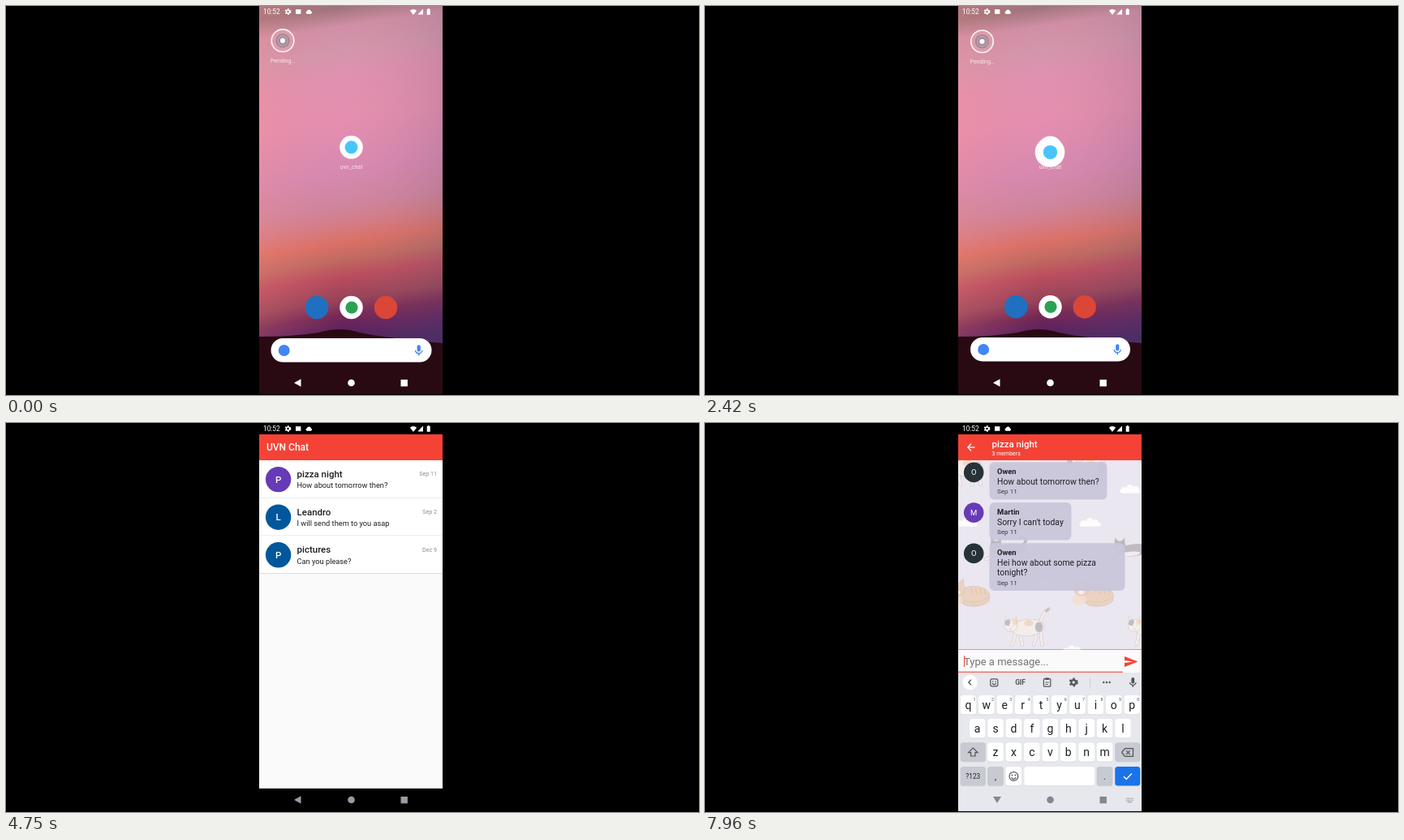
Recreate the animation shown at these times as an HTML page with a canvas. Size 854 px wide and 480 px high, loop 8 s.

```html
<!DOCTYPE html>
<html lang="en">
<head>
<meta charset="utf-8">
<title>Chat app demo</title>
<style>
html, body { margin: 0; width: 100%; height: 100%; overflow: hidden; background: #000; }
canvas { display: block; }
</style>
</head>
<body>
<canvas id="stage" width="854" height="480"></canvas>
<script>
const ctx = document.getElementById('stage').getContext('2d');
const LOOP = 8000, L = 312, R = 538, W = 226, H = 479, CX = 425.5;
const FONT = 'Roboto, Arial, sans-serif';
const RED = '#f44336', WHITE = '#fff', PAPER = '#fafafa', INK = '#1f1f23', DIM = '#9c9c9e';

// Start times of the steps, in ms
const LAUNCH = 2330, READY = 3760, LOADED = 4250, OPEN = 5250, TYPE = 7220;

// --- helpers ---
const clamp = v => Math.max(0, Math.min(1, v));
const span = (t, start, dur) => clamp((t - start) / dur);
const mix = (a, b, p) => a + (b - a) * p;
const easeInOut = (p, n) => p < .5 ? 2 ** (n - 1) * p ** n : 1 - (2 - 2 * p) ** n / 2;
const easeOut = p => 1 - (1 - p) ** 3;

function rect(x, y, w, h, fill) { ctx.fillStyle = fill; ctx.fillRect(x, y, w, h); }
function disc(x, y, r, fill) {
  ctx.beginPath(); ctx.arc(x, y, r, 0, 7); ctx.fillStyle = fill; ctx.fill();
}
function ring(x, y, r, color, width = 1) {
  ctx.beginPath(); ctx.arc(x, y, r, 0, 7);
  ctx.strokeStyle = color; ctx.lineWidth = width; ctx.stroke();
}
function round(x, y, w, h, r, fill) {
  ctx.beginPath(); ctx.roundRect(x, y, w, h, r); ctx.fillStyle = fill; ctx.fill();
}
function poly(fill, ...p) {
  ctx.beginPath();
  for (let i = 0; i < p.length; i += 2) ctx.lineTo(p[i], p[i + 1]);
  ctx.closePath(); ctx.fillStyle = fill; ctx.fill();
}
function line(color, width, ...p) {
  ctx.beginPath();
  for (let i = 0; i < p.length; i += 2) ctx.lineTo(p[i], p[i + 1]);
  ctx.strokeStyle = color; ctx.lineWidth = width; ctx.stroke();
}
function oval(x, y, rx, ry, fill, turn = 0) {
  ctx.beginPath(); ctx.ellipse(x, y, rx, ry, turn, 0, 7); ctx.fillStyle = fill; ctx.fill();
}
function text(str, x, y, size, color, weight = 400, align = 'left') {
  ctx.font = `${weight} ${size}px ${FONT}`;
  ctx.textAlign = align; ctx.fillStyle = color; ctx.fillText(str, x, y);
}
function group(draw) { ctx.save(); draw(); ctx.restore(); }
function clipRect(x, y, w, h) { ctx.beginPath(); ctx.rect(x, y, w, h); ctx.clip(); }

// --- shared icons ---
function gear(x, y, r, color) {
  ctx.setLineDash([r * .5, r * .547]);
  ring(x, y, r * .95, color, r * .4);
  ctx.setLineDash([]);
  ring(x, y, r * .6, color, r * .45);
}
function mic(x, y, s, color) {
  round(x - 2 * s, y - 6 * s, 4 * s, 8 * s, 2 * s, color);
  ctx.beginPath(); ctx.arc(x, y, 4 * s, .1, Math.PI - .1);
  ctx.strokeStyle = color; ctx.lineWidth = 1.3 * s; ctx.stroke();
  rect(x - .7 * s, y + 4 * s, 1.4 * s, 2.6 * s, color);
}
function statusBar(color) {
  text('10:52', 317, 10.2, 8.3, color);
  gear(347.5, 7, 3.4, color);
  rect(357, 4.2, 6.4, 5.6, color);
  disc(371.3, 8, 1.8, color); disc(373.4, 6.8, 2.4, color); disc(375.4, 8.1, 1.6, color);
  rect(371, 7.5, 4.6, 2.2, color);
  ctx.beginPath(); ctx.moveTo(502, 11); ctx.arc(502, 9.5, 5.6, Math.PI * 1.24, Math.PI * 1.76);
  ctx.fillStyle = color; ctx.fill();
  poly(color, 507.3, 10.6, 514, 10.6, 514, 3.6);
  rect(518.7, 4, 4, 6.8, color); rect(519.8, 3, 1.8, 1, color);
}
function navBar(color, down) {
  if (down) poly(color, 355, 461, 365, 461, 360, 469);
  else poly(color, 355, 465, 363.5, 460.3, 363.5, 469.7);
  disc(CX, 465, 4.3, color);
  rect(486.5, 461, 8.4, 8.4, color);
}

// --- home screen ---
function wallpaper() {
  const len = 420, g = ctx.createLinearGradient(CX, 0, CX + .147 * len, .978 * len);
  const stops = [[0, '#a0747c'], [.03, '#b98392'], [.055, '#d08fa6'], [.13, '#d396ac'], [.2, '#e091b0'],
    [.33, '#e58fb0'], [.48, '#d789b1'], [.58, '#cf859f'], [.635, '#d47d86'], [.69, '#db7066'],
    [.74, '#c06a60'], [.79, '#ba4d5e'], [.86, '#964257'], [.905, '#752855'], [.95, '#5b215e'], [1, '#43225e']];
  stops.forEach(s => g.addColorStop(...s));
  rect(L, 0, W, H, g);
  const side = ctx.createLinearGradient(L, 0, R, 0);
  side.addColorStop(0, 'rgba(255,145,135,.2)');
  side.addColorStop(.45, 'rgba(220,130,140,0)');
  side.addColorStop(1, 'rgba(115,95,120,.2)');
  rect(L, 0, W, 416, side);
  ctx.beginPath(); ctx.moveTo(L, 408);
  ctx.quadraticCurveTo(355, 408, 385, 403);
  ctx.quadraticCurveTo(412, 395, 436, 403);
  ctx.quadraticCurveTo(470, 410, R, 416);
  ctx.lineTo(R, H); ctx.lineTo(L, H);
  ctx.fillStyle = '#290a12'; ctx.fill();
}
function homeIcons() {
  const label = '#fbe6e6';
  disc(341, 42.7, 13.6, 'rgba(225,165,178,.65)');
  ring(341, 42.7, 13.8, '#fff6f2', 1.6);
  disc(341, 42.7, 8.8, '#a5899a');
  ring(341, 42.7, 6, '#bda2ae', 1.5);
  disc(341, 42.7, 3.1, WHITE);
  text('Pending...', 326, 70, 7, label);
  disc(CX, 174.3, 14.3, WHITE);
  disc(CX, 174.3, 8, '#47c5fb');
  text('uvn_chat', CX, 201, 7, label, 400, 'center');
  disc(383, 372, 14.3, '#1f70c1');
  disc(CX, 372, 14.3, WHITE);
  disc(CX + .5, 372, 7.6, '#2aa252');
  disc(468, 372, 14.3, '#db4636');
  round(326.5, 410, 198, 29.6, 14.8, WHITE);
  disc(342.7, 425, 7, '#4285f4');
  mic(508.7, 424.5, 1.05, '#4285f4');
}
function home(t) {
  const p = easeInOut(span(t, LAUNCH, 420), 2);
  wallpaper();
  group(() => {
    const s = 1 - .06 * p;
    ctx.globalAlpha = 1 - p ** 3;
    ctx.translate(CX, 230); ctx.scale(s, s); ctx.translate(-CX, -230);
    homeIcons();
  });
  statusBar(WHITE); navBar(WHITE);
}

// --- app window opening from its icon, then the launch screen ---
function splash(t) {
  const q = span(t, LAUNCH, 420), wide = easeInOut(q, 3), tall = easeInOut(q, 4);
  const hw = mix(14.3, 113, wide), hh = mix(14.3, 239.5, tall);
  const cy = mix(174.3, 239.5, easeInOut(q, 2));
  round(CX - .5 - hw, cy - hh, hw * 2, hh * 2, mix(Math.min(hw, hh), 0, tall), '#fdfdfd');
  group(() => {
    ctx.globalAlpha = mix(1, .45, span(t, 2800, 500));
    disc(CX, cy, mix(8, 25, wide), '#47c5fb');
  });
  if (q > .9) { statusBar('#666'); navBar('#707070'); }
}

// --- conversation list ---
function avatar(x, y, r, letter, fill, size, weight) {
  disc(x, y, r, fill);
  text(letter, x, y + size * .36, size, WHITE, weight, 'center');
}
const ROWS = [
  ['pizza night', 'How about tomorrow then?', 'Sep 11', '#673ab7'],
  ['Leandro', 'I will send them to you asap', 'Sep 2', '#01579b'],
  ['pictures', 'Can you please?', 'Dec 9', '#01579b']
];
function listPage(t) {
  rect(L, 0, W, H, '#000');
  rect(L, 14, W, 437, PAPER);
  rect(L, 14, W, 32, RED);
  text('UVN Chat', 321, 34.3, 12, WHITE, 500);
  if (t > LOADED) ROWS.forEach(([name, last, date, fill], i) => {
    const y = 46 + i * 46.6;
    rect(L, y, W, 46.6, WHITE);
    rect(L, y + 46, W, .9, '#d8d8da');
    avatar(335.6, y + 23.6, 15.7, name[0].toUpperCase(), fill, 11.5, 500);
    text(name, 358.5, y + 21.2, 11.5, INK, 500);
    text(last, 358.5, y + 34.3, 9.25, INK);
    text(date, 531, y + 19.4, 7.1, '#8a8a8e', 400, 'right');
  });
  statusBar(WHITE); navBar(DIM);
}

// --- cat wallpaper ---
const WALL = '#ebe7f0', EDGE = '#cbbfc0', GREY = '#b7b4ba', TAN = '#f0d5c0', FUR = '#fbf5f1';
function cloud(x, y) {
  disc(x - 10, y + 2, 4.5, WHITE); disc(x - 1, y - 1, 5.5, WHITE); disc(x + 8, y + 1, 5, WHITE);
  round(x - 17, y + 1, 34, 6, 3, WHITE);
}
function head(x, y, r, fill) {
  poly(fill, x - r, y, x - r * .9, y - r * 1.6, x - r * .1, y - r * .8);
  poly(fill, x + r, y, x + r * .9, y - r * 1.6, x + r * .1, y - r * .8);
  oval(x, y, r * 1.1, r, fill);
  disc(x - r * .4, y, .8, EDGE); disc(x + r * .4, y, .8, EDGE);
}
// A rounded stroke with a thin outline, for tails and legs
function limb(x1, y1, cx, cy, x2, y2, fill, width) {
  ctx.lineCap = 'round';
  for (const [c, w] of [[EDGE, width + 1.3], [fill, width]]) {
    ctx.beginPath(); ctx.moveTo(x1, y1); ctx.quadraticCurveTo(cx, cy, x2, y2);
    ctx.strokeStyle = c; ctx.lineWidth = w; ctx.stroke();
  }
  ctx.lineCap = 'butt';
}
function calico(x, y) {
  limb(x + 22, y - 6, x + 24, y - 22, x + 36, y - 30, FUR, 4);
  line(GREY, 3, x + 30, y - 25, x + 36, y - 30);
  for (const [dx, lean] of [[-17, -5], [-9, 3], [16, -4], [23, 2]])
    limb(x + dx, y + 4, x + dx, y + 16, x + dx + lean, y + 27, FUR, 4);
  oval(x + 3, y, 25.7, 13.4, EDGE, -.1); oval(x + 3, y, 25, 12.7, FUR, -.1);
  oval(x + 4, y - 7, 7, 5, TAN); oval(x + 20, y - 1, 6, 8, GREY);
  head(x - 24, y - 3, 9.6, EDGE); head(x - 24, y - 3, 9, FUR);
  oval(x - 29, y - 8, 4, 5, GREY, .4); oval(x - 17, y - 9, 4.5, 4.5, TAN);
  oval(x - 24, y + 3, 1.2, .8, '#e2a093');
}
function ginger(x, y) {
  oval(x + 8, y + 4, 25.7, 16.2, EDGE); oval(x + 8, y + 4, 25, 15.5, TAN);
  for (let i = 0; i < 4; i++) line('#e3bfa4', 1.4, x + 4 + i * 7, y - 10 + i, x + 6 + i * 7, y - 1 + i);
  limb(x + 29, y + 10, x + 20, y + 19, x - 4, y + 15, TAN, 6);
  oval(x - 20, y + 9, 11, 9, '#f4e0cf');
  head(x - 17, y - 7, 10.7, EDGE); head(x - 17, y - 7, 10, TAN);
  oval(x - 17, y - 2, 4.5, 3, FUR);
}
function leaper(x, y) {
  limb(x + 24, y - 4, x + 38, y - 17, x + 22, y - 18, GREY, 3.6);
  limb(x - 14, y + 5, x - 22, y + 14, x - 32, y + 16, FUR, 4);
  limb(x + 22, y + 5, x + 26, y + 14, x + 34, y + 10, FUR, 4);
  oval(x + 5, y + 2, 25, 9.5, GREY, -.12);
  oval(x, y + 8, 16, 3.5, FUR, -.1);
  head(x - 16, y - 4, 8.5, GREY); oval(x - 17, y, 4, 3, FUR);
}
function cats() {
  for (let i = -1; i < 2; i++) {
    const x = i * 193;
    calico(388 + x, 348); calico(485 + x, 98);
    ginger(491 + x, 295); leaper(357 + x, 225);
    head(321 + x, 419, 8, GREY);
    cloud(415 + x, 279); cloud(460 + x, 382); cloud(358 + x, 131); cloud(488 + x, 183);
  }
}

// --- conversation ---
const TALK = [
  [48.3, 145, 46.3, 'Owen', ['How about tomorrow then?'], '#263238'],
  [98, 101, 46.5, 'Martin', ["Sorry I can't today"], '#673ab7'],
  [148.3, 167, 58.7, 'Owen', ['Hei how about some pizza', 'tonight?'], '#263238']
];
function message([y, w, h, name, lines, fill]) {
  avatar(331.2, y + 12.6, 12.3, name[0], fill, 9.5, 400);
  round(350.5, y, w, h, 6, 'rgba(202,198,219,.94)');
  text(name, 360, y + 14.6, 9.3, INK, 600);
  lines.forEach((s, i) => text(s, 360, y + 27.7 + i * 12.2, 10.4, INK));
  text('Sep 11', 360, y + h - 7.5, 8.1, '#38373f');
}
function chatPage(t) {
  const p = easeOut(span(t, TYPE, 240));
  const top = mix(479, 308, p), bottom = Math.min(451, top), body = bottom - 28.4;
  rect(L, 0, W, H, '#000');
  if (p < .5) rect(L, 3, W, 11, '#4a1411');
  group(() => {
    clipRect(L, 46, W, body - 46);
    rect(L, 46, W, 410, WALL);
    // The wallpaper covers the space above the input, centred
    const k = Math.max(226, (body - 46) * 286 / 377) / 286;
    ctx.translate(425, (46 + body) / 2); ctx.scale(k, k); ctx.translate(-425, -234.5);
    ctx.globalAlpha = .85;
    cats();
  });
  rect(L, 14, W, 32, RED);
  line(WHITE, 1.3, 332.5, 30, 324, 30);
  line(WHITE, 1.3, 328, 25.7, 323.8, 30, 328, 34.3);
  text('pizza night', 353.5, 29.8, 11.5, WHITE, 500);
  text('3 members', 353.5, 40, 7, WHITE);
  TALK.forEach(message);

  rect(L, body, W, 28.4, PAPER);
  text('Type a message...', 319, bottom - 9, 13, '#737376');
  const y = bottom - 13.5;
  poly(RED, 517, y - 6.6, 533.5, y, 517, y + 6.6, 517, y + 1.5, 528, y, 517, y - 1.5);
  if (p > 0) {
    rect(L, bottom - 1.3, 203, 1.1, RED);
    rect(319, bottom - 21, 1, 14, RED);
  }
  statusBar(WHITE);
  if (p > 0) group(() => {
    clipRect(L, top, W, H - top);
    ctx.translate(0, top - 308);
    keyboard();
  });
  if (p < .5) navBar(DIM);
  else { navBar('#85878d', true); miniKeys(); }
}

// --- on-screen keyboard ---
const KEY = '#fff', MOD = '#c8cad2', GLYPH = '#505359';
function key(x, y, w, label, fill = KEY, size = 14) {
  round(x - w / 2, y - 11.8, w, 24, 3.5, '#cfd1d8');
  round(x - w / 2, y - 12, w, 23.4, 3.5, fill);
  if (label) text(label, x, y + size * .34, size, INK, 400, 'center');
}
function keyRow(letters, x, y) {
  [...letters].forEach((c, i) => key(x + i * 22.43, y, 19.6, c));
}
function face(x, y, r) {
  ring(x, y, r, GLYPH, 1.2);
  disc(x - 2, y - 1.5, .9, GLYPH); disc(x + 2, y - 1.5, .9, GLYPH);
  ctx.beginPath(); ctx.arc(x, y + .6, 2.8, .2, 2.94); ctx.stroke();
}
function toolbar() {
  disc(326.5, 320, 9.2, KEY);
  line(GLYPH, 1.3, 328, 316.8, 324.8, 320, 328, 323.2);
  ctx.strokeStyle = GLYPH; ctx.lineWidth = 1.2;
  ctx.beginPath(); ctx.roundRect(351.8, 315.8, 9, 9, 2); ctx.stroke();
  disc(354.7, 319, .8, GLYPH); disc(358, 319, .8, GLYPH);
  ctx.beginPath(); ctx.arc(356.3, 320.4, 2.2, .2, 2.94); ctx.stroke();
  text('GIF', 388.5, 323, 8.4, GLYPH, 700, 'center');
  ctx.beginPath(); ctx.roundRect(417.4, 315.6, 8.4, 9.6, 1); ctx.stroke();
  rect(419.4, 314.4, 4.4, 2.6, GLYPH);
  line(GLYPH, .9, 419.3, 320, 424, 320); line(GLYPH, .9, 419.3, 322.4, 422.8, 322.4);
  gear(454.2, 320, 4.8, GLYPH);
  rect(474, 315, .8, 11, '#c4c6cd');
  for (let i = -1; i < 2; i++) disc(495 + i * 3.7, 320, 1.2, GLYPH);
  mic(527.3, 319.6, .95, GLYPH);
}
function keyboard() {
  rect(L, 308, W, 171, '#e6e8ee');
  toolbar();
  keyRow('qwertyuiop', 324.4, 348);
  for (let i = 0; i < 10; i++) text(String((i + 1) % 10), 332 + i * 22.43, 343, 5.4, GLYPH, 400, 'center');
  keyRow('asdfghjkl', 335.6, 377);
  keyRow('zxcvbnm', 358, 406.3);
  key(330.3, 406.3, 31, '', MOD);
  line(GLYPH, 1.2, 330.3, 400.8, 336, 406.6, 333, 406.6, 333, 411, 327.6, 411, 327.6, 406.6, 324.6, 406.6, 330.3, 400.8);
  key(520.8, 406.3, 31, '', MOD);
  line(GLYPH, 1.2, 513.5, 406.5, 517.5, 401.6, 527.5, 401.6, 527.5, 411.4, 517.5, 411.4, 513.5, 406.5);
  line(GLYPH, 1.1, 519, 404.2, 523.8, 409); line(GLYPH, 1.1, 523.8, 404.2, 519, 409);
  key(330.3, 436, 31, '?123', MOD, 8.3);
  key(358, 436, 19.6, ',', MOD, 11);
  key(380.4, 436, 19.6);
  face(380.4, 436, 5.4);
  key(436.7, 436, 87);
  key(492.5, 436, 19.6, '.', MOD, 11);
  key(520.8, 436, 31, '', '#1a73e8');
  line(WHITE, 1.4, 516, 436.2, 519.2, 439.4, 526, 432.6);
}
function miniKeys() {
  for (let i = 0; i < 4; i++) {
    rect(519 + i * 2.4, 462.8, 1.5, 1.3, DIM);
    rect(519 + i * 2.4, 465, 1.5, 1.3, DIM);
  }
  rect(520.5, 467.2, 5.6, 1.2, DIM);
}

// --- timeline ---
function draw(t) {
  rect(0, 0, 854, 480, '#000');
  group(() => {
    clipRect(L, 0, W, H);
    if (t < LAUNCH + 420) home(t);
    if (t >= LAUNCH && t < READY + 120) splash(t);
    if (t >= READY && t < OPEN + 300) group(() => {
      ctx.globalAlpha = span(t, READY, 120);
      listPage(t);
    });
    if (t >= OPEN) group(() => {
      const p = easeOut(span(t, OPEN, 300)), s = mix(.88, 1, p);
      ctx.globalAlpha = p;
      ctx.translate(CX, 239.5); ctx.scale(s, s); ctx.translate(-CX, -239.5);
      clipRect(L, 0, W, H);
      chatPage(t);
    });
  });
}
const begin = performance.now();
function tick() {
  draw((performance.now() - begin) % LOOP);
  requestAnimationFrame(tick);
}
tick();
</script>
</body>
</html>
```
